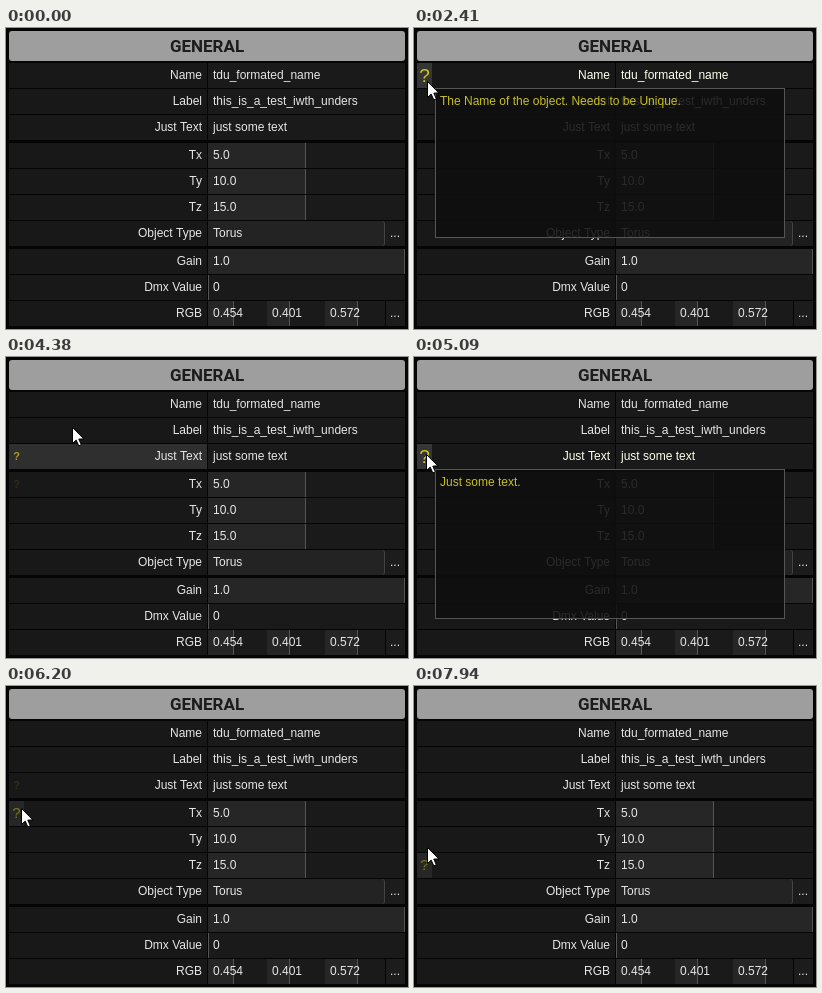
Write an HTML page with a canvas that moves like this. It is 402 by 301 pixels and loops after 8000 ms.

```html
<!DOCTYPE html>
<html lang="en">
<head>
<meta charset="utf-8">
<title>Parameter panel</title>
<style>
html, body { margin: 0; width: 100%; height: 100%; overflow: hidden; background: #050505; }
canvas { display: block; }
</style>
</head>
<body>
<canvas id="stage" width="402" height="301"></canvas>
<script>
const ctx = document.getElementById('stage').getContext('2d');
const LOOP = 8000, LAG = 80, ROW_H = 25;
const FONT = '"Liberation Sans", Arial, sans-serif';

const rows = [
  { y: 35, label: 'Name', text: 'tdu_formated_name', tip: 'The Name of the object. Needs to be Unique.' },
  { y: 61, label: 'Label', text: 'this_is_a_test_iwth_unders', tip: 'The Label of the object.' },
  { y: 87, label: 'Just Text', text: 'just some text', tip: 'Just some text.' },
  { y: 115, label: 'Tx', text: '5.0', fill: 98, tip: 'X Position of the object.' },
  { y: 141, label: 'Ty', text: '10.0', fill: 98 },
  { y: 167, label: 'Tz', text: '15.0', fill: 98 },
  { y: 193, label: 'Object Type', text: 'Torus', menu: true },
  { y: 221, label: 'Gain', text: '1.0', fill: 197 },
  { y: 247, label: 'Dmx Value', text: '0', fill: 1 },
  { y: 273, label: 'RGB', rgb: [0.454, 0.401, 0.572] }
];

// Bursts of movement: start, end, number of steps
const bursts = [
  [520, 920, 6], [1070, 1870, 11], [2410, 3200, 11], [3280, 3440, 3],
  [3590, 3670, 2], [3900, 4700, 11], [4770, 5170, 6], [5320, 6120, 11],
  [6200, 6590, 6], [6900, 7700, 11], [7780, 7940, 3]
];

// Pointer path: time, x, y
const path = [
  [520, 96, 0], [760, 70, 40], [920, 64, 55], [1070, 64, 55],
  [1310, 40, 51], [1630, 12, 52], [2330, 12, 52], [2410, 13, 53],
  [2490, 30, 51], [2730, 66, 50], [3040, 50, 51], [3120, 18, 57],
  [3280, 13, 60], [3360, 13, 66], [3440, 13, 67], [3900, 14, 68],
  [3980, 30, 76], [4140, 62, 118], [4220, 66, 122], [4300, 67, 98],
  [4380, 66, 70], [4540, 42, 84], [4700, 14, 95], [5170, 12, 97],
  [5320, 14, 98], [5400, 40, 102], [5560, 60, 130], [5640, 62, 126],
  [5720, 62, 108], [5880, 58, 80], [6040, 32, 108], [6120, 17, 118],
  [6280, 13, 125], [6590, 13, 125], [6900, 14, 126], [6980, 32, 131],
  [7140, 60, 150], [7400, 55, 195], [7620, 30, 214], [7700, 13, 218],
  [7780, 13, 192.5], [7860, 13, 185], [7940, 13, 161]
];

function snap(t) {
  let out = 0;
  for (const [a, b, n] of bursts) {
    if (t < a) break;
    const step = (b - a) / (n - 1);
    out = a + Math.floor((Math.min(t, b) - a) / step + 1e-6) * step;
  }
  return out;
}

function pointer(t) {
  if (t < path[0][0]) return null;
  for (let i = 1; i < path.length; i++) {
    const [t0, x0, y0] = path[i - 1], [t1, x1, y1] = path[i];
    if (t <= t1) {
      const k = (t - t0) / (t1 - t0);
      return [x0 + (x1 - x0) * k, y0 + (y1 - y0) * k];
    }
  }
  return path[path.length - 1].slice(1);
}

// 1 when the pointer is over the row's label (or its help button)
function over(row, button, t) {
  const p = pointer(t);
  if (!p || p[0] >= 202 || p[1] < row.y || p[1] >= row.y + ROW_H) return 0;
  return (p[0] < 19) === button ? 1 : 0;
}

function blend(row, button, t, lag, w) {
  return w * over(row, button, t - lag) + (1 - w) * over(row, button, t - lag - LAG);
}

function rect(x, y, w, h, color) {
  ctx.fillStyle = color;
  ctx.fillRect(x, y, w, h);
}

function text(str, x, y, color, align = 'left', font = '12px ' + FONT) {
  ctx.font = font;
  ctx.textAlign = align;
  ctx.fillStyle = color;
  ctx.fillText(str, x, y);
}

function slider(x, y, w) {
  rect(x, y, w, ROW_H, '#262626');
  rect(x + w - 1, y, 1, ROW_H, '#555');
}

function dots(y) {
  rect(380, y, 19, ROW_H, '#1c1c1c');
  text('...', 389, y + 16, '#e6e6e6', 'center');
}

function drawRow(row, t) {
  const y = row.y, base = y + 16;
  const hot = blend(row, false, t, LAG, 0.85);
  const help = blend(row, true, t, LAG, 0.5);
  const ink = help > 0.9 ? '#fffff0' : '#e6e6e6';

  rect(3, y, 198, ROW_H, '#181818');
  rect(202, y, 197, ROW_H, '#1a1a1a');
  if (hot > 0.3) {
    ctx.globalAlpha = hot;
    rect(3, y, 198, ROW_H, '#333');
  }
  if (hot > 0) {
    ctx.globalAlpha = hot;
    text('?', 10.5, y + 16, '#c8a81e', 'center', 'bold 11px ' + FONT);
  }
  if (help > 0) {
    ctx.globalAlpha = help;
    rect(3, y, 15, ROW_H, '#363636');
    const size = 11 + 8 * help;
    text('?', 10.5, y + 12 + size * 0.36, '#d0c81c', 'center', size + 'px ' + FONT);
  }
  ctx.globalAlpha = 1;
  text(row.label, 196, base, ink, 'right');

  if (row.fill) slider(202, y, row.fill);
  if (row.menu) {
    ctx.beginPath();
    ctx.roundRect(202, y, 177, ROW_H, [0, 3, 3, 0]);
    ctx.fillStyle = '#444';
    ctx.fill();
    ctx.beginPath();
    ctx.roundRect(202, y, 176, ROW_H, [0, 3, 3, 0]);
    ctx.fillStyle = '#232323';
    ctx.fill();
    dots(y);
  }
  if (row.rgb) {
    rect(379, y, 1, ROW_H, '#050505');
    row.rgb.forEach((v, i) => {
      const x = Math.round(202 + i * 58.6);
      slider(x, y, Math.round(v * 58));
      text(v.toFixed(3), x + 5, base, ink);
    });
    dots(y);
  } else {
    text(row.text, 207, base, ink);
  }
}

function drawTip(row, t) {
  if (!row.tip) return;
  const a = blend(row, true, t, 2 * LAG, 0.5);
  if (!a) return;
  const y = row.y + ROW_H;
  ctx.globalAlpha = a;
  rect(21, y, 350, 150, 'rgba(14,14,14,0.87)');
  ctx.strokeStyle = '#555';
  ctx.lineWidth = 1;
  ctx.strokeRect(21.5, y + 0.5, 349, 149);
  text(row.tip, 26, y + 17, '#c8c01e');
  ctx.globalAlpha = 1;
}

function drawPointer(t) {
  const p = pointer(t);
  if (!p) return;
  ctx.save();
  ctx.translate(Math.round(p[0]) + 0.5, Math.round(p[1]) + 0.5);
  ctx.beginPath();
  [[0, 0], [0, 16], [3.7, 12.6], [6.3, 18.4], [8.8, 17.3], [6.3, 11.6], [11.3, 11.4]]
    .forEach(([x, y]) => ctx.lineTo(x, y));
  ctx.closePath();
  ctx.fillStyle = '#fff';
  ctx.fill();
  ctx.strokeStyle = '#000';
  ctx.lineWidth = 1;
  ctx.stroke();
  ctx.restore();
}

function draw(t) {
  rect(0, 0, 402, 301, '#050505');
  ctx.beginPath();
  ctx.roundRect(3, 3, 396, 30, 3);
  ctx.fillStyle = '#9e9e9e';
  ctx.fill();
  text('GENERAL', 201, 24, '#1c1c1c', 'center', 'bold 17px Roboto, sans-serif');
  for (const row of rows) drawRow(row, t);
  for (const row of rows) drawTip(row, t);
  drawPointer(t);
}

const start = performance.now();
function tick() {
  draw(snap((performance.now() - start) % LOOP));
  requestAnimationFrame(tick);
}
tick();
</script>
</body>
</html>
```
